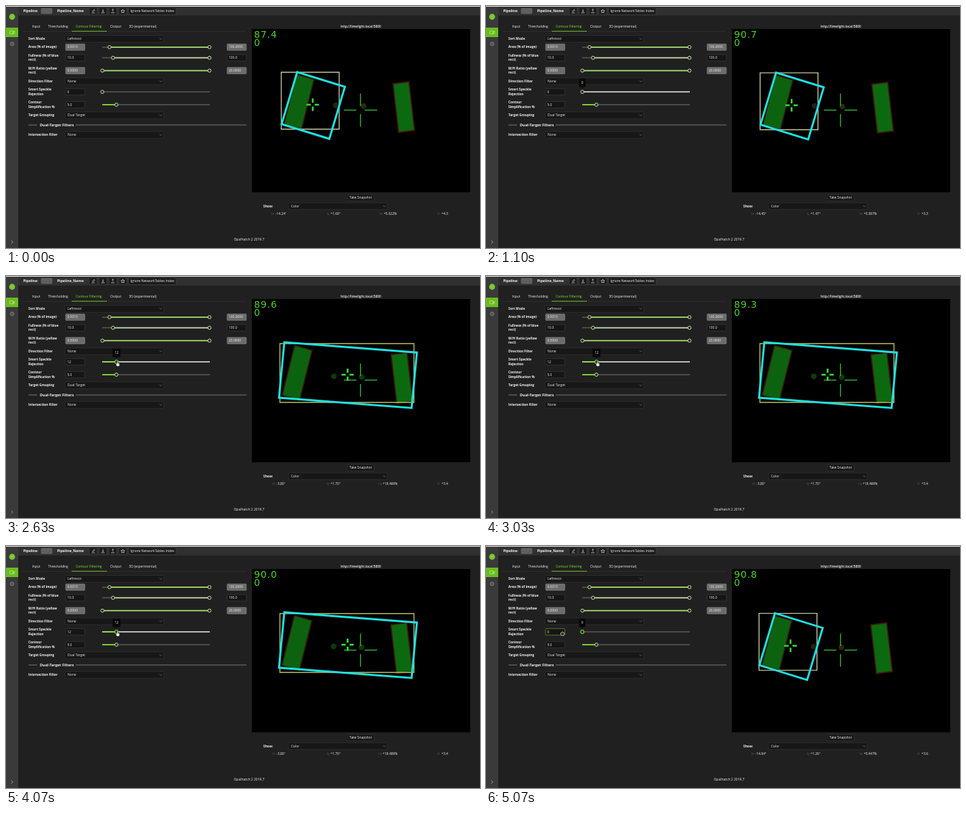
An HTML page with a canvas for the animation above (5110 ms loop, 700x358 px).

```html
<!DOCTYPE html>
<html lang="en">
<head>
<meta charset="utf-8">
<title>Contour filtering</title>
<style>
html, body { margin: 0; width: 100%; height: 100%; overflow: hidden; background: #202020; }
canvas { display: block; width: 700px; height: 358px; }
</style>
</head>
<body>
<canvas id="stage"></canvas>
<script>
const LOOP = 5110;
const LIME = '#86e436', PALE = '#c2ee98', WHITE = '#f4f4f4', CYAN = '#22dfe0';
const canvas = document.getElementById('stage');
const g = canvas.getContext('2d');
const ratio = window.devicePixelRatio || 1;
canvas.width = 700 * ratio;
canvas.height = 358 * ratio;

const ramp = (t, a, b) => Math.min(1, Math.max(0, (t - a) / (b - a)));

// Everything that moves, as a function of time.
function stateAt(t) {
  const grouped = t >= 2250 && t < 4550;
  const settle = 1 - Math.exp(-t / 1600);
  const drag = ramp(t, 2000, 2380) - ramp(t, 4300, 4680);
  const leave = ramp(t, 4780, 4950);
  return {
    grouped,
    drift: [-3.4 * settle, 1.7 * settle],
    speckle: Math.round(12 * drag),
    tip: t >= 700,
    hover: t >= 700 && t < 4800,
    active: t >= 1600,
    focus: t >= 4950,
    pointer: t >= 1300 && [144.5 + 20.5 * drag - 31.5 * leave, 140 - 10 * ramp(t, 1300, 1600)],
    fps: grouped ? 89.7 - 0.4 * Math.sin((t - 2550) / 390) : 90.8 - 3.4 * Math.exp(-t / 300),
    tx: grouped ? -3.8 : -14.24 - 0.42 * settle,
    ty: grouped ? 1.7 : 1.69 - 0.45 * settle,
    ta: grouped ? 18.489 : 5.322 + 0.13 * settle,
    tl: grouped ? 3.4 : 3.8 + 0.5 * Math.cos(t * Math.PI / 1100)
  };
}

function text(s, x, y, { size = 4.9, weight = 500, color = WHITE, align = 'left' } = {}) {
  g.font = `${weight} ${size}px "Open Sans", "Noto Sans", sans-serif`;
  g.fillStyle = color;
  g.textAlign = align;
  g.textBaseline = 'middle';
  g.fillText(s, x, y + 0.3);
}
const bold = (s, x, y, size = 4.8) => text(s, x, y, { size, weight: 700 });

function paint(fill, stroke, width) {
  if (fill) { g.fillStyle = fill; g.fill(); }
  if (stroke) { g.strokeStyle = stroke; g.lineWidth = width; g.stroke(); }
}

function box(x, y, w, h, fill, stroke, r = 1, width = 0.6) {
  g.beginPath();
  g.roundRect(x, y, w, h, r);
  paint(fill, stroke, width);
}

function disc(x, y, r, fill, stroke, width = 1) {
  g.beginPath();
  g.arc(x, y, r, 0, Math.PI * 2);
  paint(fill, stroke, width);
}

function line(x1, y1, x2, y2, color, width) {
  g.beginPath();
  g.moveTo(x1, y1);
  g.lineTo(x2, y2);
  paint(null, color, width);
}

function chevron(x, y, size, angle, color) {
  g.save();
  g.translate(x, y);
  g.rotate(angle);
  line(-size, -size / 2, 0, size / 2, color, 0.6);
  line(size, -size / 2, 0, size / 2, color, 0.6);
  g.restore();
}

// Parallelogram from a corner and its two edges.
function slab(x, y, [ax, ay], [bx, by], fill, stroke, width) {
  g.beginPath();
  g.moveTo(x, y);
  g.lineTo(x + ax, y + ay);
  g.lineTo(x + ax + bx, y + ay + by);
  g.lineTo(x + bx, y + by);
  g.closePath();
  paint(fill, stroke, width);
}

function plus(x, y, near, far, color, width) {
  for (const d of [-1, 1]) {
    line(x + d * near, y, x + d * far, y, color, width);
    line(x, y + d * near, x, y + d * far, color, width);
  }
}

// Closed shape whose radius alternates around its centre.
function spikes(x, y, count, inner, outer, color) {
  g.beginPath();
  for (let i = 0; i < count * 2; i++) {
    const a = i * Math.PI / count - Math.PI / 2, r = i % 2 ? inner : outer;
    g.lineTo(x + Math.cos(a) * r, y + Math.sin(a) * r);
  }
  g.closePath();
  paint(null, color, 0.7);
}

function select(x, y, label) {
  box(x, y - 5, 146, 10, '#171717', '#363636');
  text(label, x + 4, y);
  chevron(x + 141.7, y, 1.9, 0, '#888');
}

function input(x, y, label, off, focus) {
  box(x, y - 4.8, 28.5, 9.6, off ? '#6c6c6c' : '#151515', focus ? '#6fc326' : off ? '#858585' : '#444');
  text(label, x + 2.5, y);
}

function rail(y, from, to, color, base = '#5a5a5a') {
  line(142, y, 301, y, base, 1.5);
  line(from, y, to, y, color, 1.7);
}
const thumb = (x, y, color = PALE) => disc(x, y, 2.4, '#1d1d1d', color);

function range(y, from, color, low, high, off) {
  input(88, y, low, off);
  rail(y, from, 300.5, color);
  thumb(from, y);
  thumb(300.5, y);
  input(326.5, y, high, off);
}

function sidebar() {
  g.fillStyle = '#3a3a3a';
  g.fillRect(0, 0, 18, 358);
  disc(9, 16, 4.4, '#7bc832');
  g.fillStyle = '#69bd1d';
  g.fillRect(0, 32, 18, 14);
  box(5.7, 36.8, 4.8, 4.4, null, '#e5f5d5');
  slab(10.6, 38.4, [1.9, -0.9], [0, 3], null, '#e5f5d5', 0.5);
  spikes(9, 56, 8, 2.2, 3, '#9a9a9a');
  disc(9, 56, 0.9, null, '#9a9a9a', 0.5);
  chevron(9, 349.2, 2.2, -Math.PI / 2, '#ddd');
}

function header() {
  g.fillStyle = '#303030';
  g.fillRect(18, 0, 682, 14);
  bold('Pipeline:', 25.5, 7.3, 5.1);
  box(52, 3.6, 16, 7.6, '#5f5f5f', '#707070');
  bold('Pipeline_Name', 75.5, 7.3, 5.3);
  for (let i = 0; i < 4; i++) box(123 + 14.6 * i, 2.5, 11.3, 10.3, '#1a1a1a', '#444');
  slab(127.4, 8, [2.8, -3], [1.1, 1], null, WHITE, 0.6);
  line(126.3, 10.2, 131.5, 10.2, WHITE, 0.6);
  for (const [x, turn] of [[143.2, 0], [157.8, Math.PI]]) {
    line(x, 4.6, x, 8.4, WHITE, 0.6);
    chevron(x, turn ? 5.2 : 7.8, 1.4, turn, WHITE);
    line(x - 2.6, 10, x + 2.6, 10, WHITE, 0.7);
  }
  spikes(172.5, 7.8, 5, 1.4, 2.9, WHITE);
  box(181, 2.5, 70, 10.3, '#1a1a1a', '#444');
  text('Ignore NetworkTables Index', 216, 7.5, { size: 5, align: 'center' });
  g.fillStyle = '#eee';
  g.fillRect(0, 0, 700, 1);
}

function tabs() {
  line(25, 37.6, 355, 37.6, '#363636', 0.6);
  text('Input', 38.5, 30.6);
  text('Thresholding', 62, 30.6);
  text('Contour Filtering', 103, 30.6, { color: LIME });
  text('Output', 154, 30.6);
  text('3D (experimental)', 181.5, 30.6);
  line(97, 37.3, 149, 37.3, '#6fc326', 1);
}

function speckleRow(y, s) {
  const x = 142.2 + s.speckle * 1.75;
  input(88, y, String(s.speckle), false, s.focus);
  rail(y, 142.2, x, LIME, s.hover ? '#f0f0f0' : '#5a5a5a');
  if (s.active) disc(x, y, 3.4, 'rgba(100,190,30,.45)');
  thumb(x, y, s.active ? LIME : PALE);
  return x;
}

function form(s) {
  let top = 42.3;
  // Places a label of one or two lines and returns the middle of its row.
  const row = (a, b) => {
    const half = b ? 9.5 : 6.2, y = top + half;
    top = y + half;
    bold(a, 33, b ? y - 3.2 : y);
    if (b) bold(b, 33, y + 3.2);
    return y;
  };
  select(87, row('Sort Mode'), 'Leftmost');
  range(row('Area (% of image)'), 152.8, '#9fe066', '0.0010', '100.0000', true);
  range(row('Fullness (% of blue', 'rect)'), 158, '#c8d6a8', '10.0', '100.0');
  range(row('W/H Ratio (yellow', 'rect)'), 142.3, '#9fe066', '0.0000', '20.0000', true);
  select(87, row('Direction Filter'), 'None');

  const tipY = top - 3.7;
  const x = speckleRow(row('Smart Speckle', 'Rejection'), s);

  const y = row('Contour', 'Simplification %');
  input(88, y, '5.0');
  rail(y, 142.2, 163, LIME);
  thumb(163, y);
  select(87, row('Target Grouping'), 'Dual Target');

  line(33, 176, 46, 176, '#a0a0a0', 0.7);
  bold('Dual-Target Filters', 50, 175.8, 5.5);
  line(103, 176, 355, 176, '#a0a0a0', 0.7);
  top += 16.6;
  select(87, row('Intersection Filter'), 'None');

  if (s.tip) {
    const half = s.speckle > 9 ? 5.8 : 4.8;
    box(x - half, tipY - 6.2, half * 2, 12.2, '#080808', null, 1.5);
    slab(x - 2, tipY + 6, [2, -2], [2, 2], '#080808');
    text(String(s.speckle), x, tipY, { align: 'center' });
  }
}

function overlay(s) {
  g.font = '14px "DejaVu Sans", sans-serif';
  g.letterSpacing = '0.8px';
  g.fillStyle = '#4fd02a';
  g.textAlign = 'left';
  g.textBaseline = 'alphabetic';
  g.fillText(s.fps.toFixed(1), 366.3, 47);
  g.fillText('0', 366.3, 59.4);
  g.letterSpacing = '0px';
}

function camera(s) {
  const [dx, dy] = s.drift;
  g.fillStyle = '#000';
  g.fillRect(363, 34, 322.5, 241.5);

  g.save();
  g.translate(dx, dy);
  g.filter = 'blur(0.6px)';
  slab(429, 101, [26, 7.5], [-18.5, 74], '#0c620e', '#32140e', 1.8);
  slab(571.5, 115, [23.5, -3], [8.3, 72], '#0b6a10', '#42170f', 1.8);
  disc(487, 147, 4.2, s.grouped ? '#0d3a0b' : '#26220e');
  disc(528, 148, 4.2, s.grouped ? '#0d3a0b' : '#2d2710');
  g.filter = 'none';
  if (!s.grouped) {
    box(406.5, 98, 85.5, 84.2, null, '#c3c698', 0, 1.4);
    slab(430, 97.7, [70.5, 21.8], [-23, 77], null, CYAN, 3);
  }
  g.restore();

  if (s.grouped) {
    box(404.5, 100, 198, 87, null, '#bcbe62', 0, 1.4);
    slab(411, 98, [195.8, 15.2], [-7.8, 82], null, CYAN, 3);
  }
  plus(523.5, 154, 6, 24.5, '#35b83a', 1.4);
  if (s.grouped) plus(504.5, 146, 2.8, 9, '#39e03b', 2.6);
  else plus(453 + dx, 146 + dy, 2.8, 9.3, '#39d83b', 2.6);
  overlay(s);
}

function readout(name, value, digits, unit, x) {
  const s = (value < 0 ? '' : '+') + value.toFixed(digits) + unit;
  g.font = '500 4.9px "Open Sans", "Noto Sans", sans-serif';
  const left = x - (g.measureText(s).width + 6) / 2;
  text(name, left, 307.8, { color: '#2f7a25' });
  text(s, left + 6, 307.8);
}

function panel(s) {
  text('http://limelight.local:5800', 524, 30.2, { size: 4.8, weight: 600, align: 'center' });
  camera(s);
  box(504, 278.5, 39.5, 10.2, '#191919', '#3b3b3b');
  text('Take Snapshot', 523.8, 283.5, { align: 'center' });
  bold('Show:', 380, 296.1);
  select(417, 296.1, 'Color');
  readout('tx', s.tx, 2, '°', 403);
  readout('ty', s.ty, 2, '°', 483.7);
  readout('ta', s.ta, 3, '%', 564.3);
  readout('tl', s.tl, 1, '', 645);
  text('Opalhatch 2 2019.7', 359, 345.8, { size: 5, align: 'center' });
}

function cursor([x, y]) {
  if (x < 118) return disc(x, y, 2.8, '#333', '#a5a5a5');
  box(x - 1.4, y - 4, 1.6, 5, '#fff', '#111', 0.8, 0.5);
  box(x - 2.2, y - 1, 4.8, 4.4, '#fff', '#111', 1.4, 0.4);
}

function draw(t) {
  const s = stateAt(t);
  g.setTransform(ratio, 0, 0, ratio, 0, 0);
  g.fillStyle = '#202020';
  g.fillRect(0, 0, 700, 358);
  sidebar();
  header();
  tabs();
  form(s);
  panel(s);
  if (s.pointer) cursor(s.pointer);
}

const start = performance.now();
function frame() {
  draw((performance.now() - start) % LOOP);
  requestAnimationFrame(frame);
}
frame();
</script>
</body>
</html>
```
